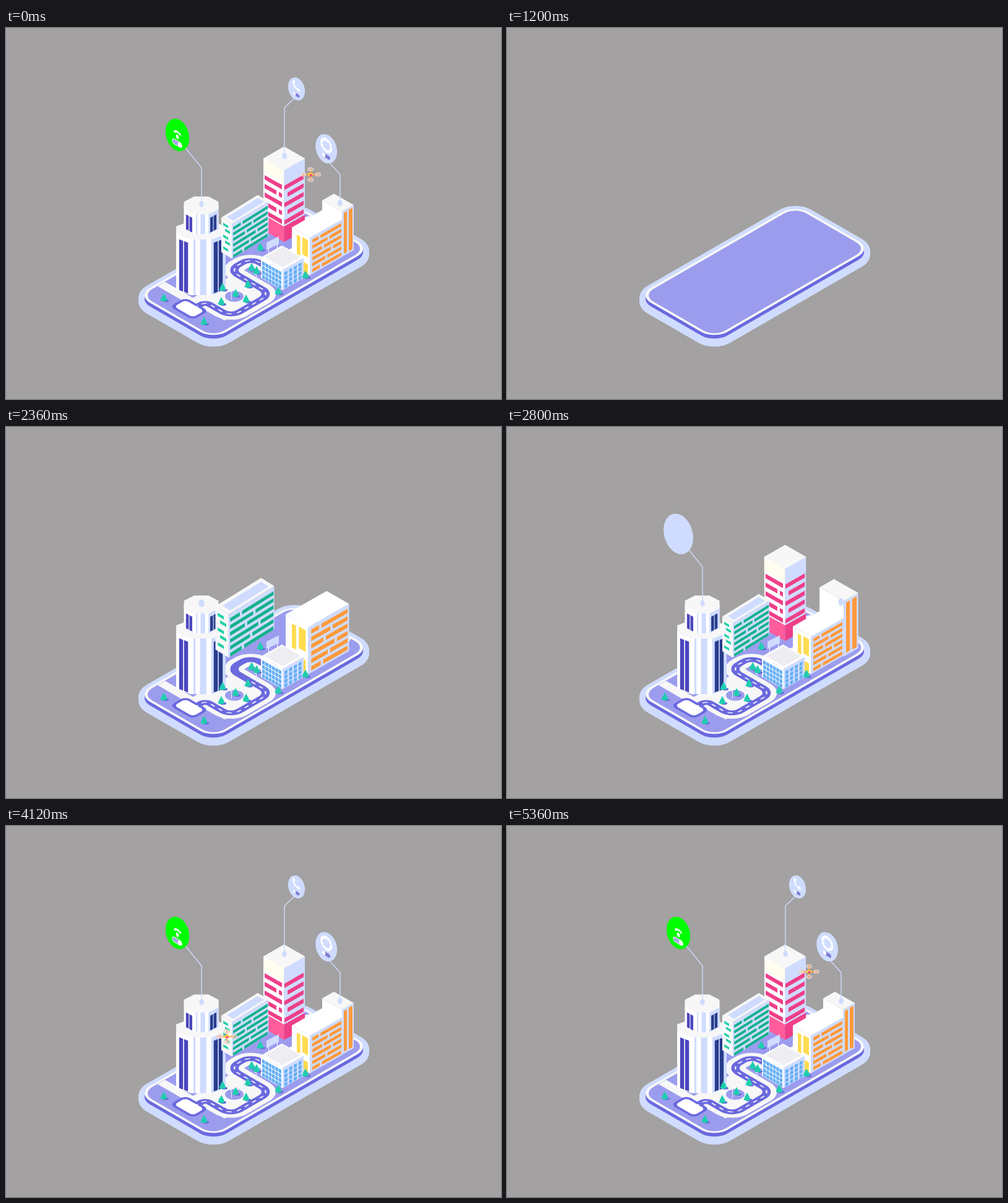
An HTML page with a canvas for the animation above (5.4 s loop, 800 by 600 pixels).

```html
<!DOCTYPE html>
<html>
<head>
<meta charset="utf-8">
<style>
html, body { margin: 0; width: 100%; height: 100%; overflow: hidden; background: #a3a1a1 }
canvas { display: block }
</style>
</head>
<body>
<canvas id="c" width="800" height="600"></canvas>
<script>
const g = document.getElementById('c').getContext('2d');
const GREY = '#a3a1a1', WHITE = '#f7f7f7', PALE = '#cfdcff', DARK = '#6b69de', LILAC = '#9c9cee', BLUE = '#4945bd',
  NAVY = '#283c8c', GREEN = '#14b18c', TEAL = '#20cdb0', PINK = '#ee3f88', ORANGE = '#ff9a3c', YELLOW = '#ffdc50', SKY = '#63aef5';
const LOOP = 5400, K = .57;
let t = 0;

const clamp = x => Math.max(0, Math.min(1, x));
const prog = (start, dur) => clamp((t - start) / dur);
const out = (start, dur) => 1 - (1 - prog(start, dur)) ** 3;

// Grow to 1.25 and settle back to 1
function pop(start) {
  const x = (t - start) / 200;
  if (x <= 0) return 0;
  return x < 1 ? 1.25 * Math.sin(x * Math.PI / 2) : 1.125 + .125 * Math.cos(Math.PI * clamp(x - 1));
}

function group(x, y, s, draw) {
  if (s <= 0) return;
  g.save();
  g.translate(x, y);
  g.scale(s, s);
  g.translate(-x, -y);
  draw();
  g.restore();
}

function poly(color, points) {
  g.fillStyle = color;
  g.beginPath();
  points.forEach(p => g.lineTo(...p));
  g.fill();
}

function oval(color, x, y, rx, ry, turn = 0) {
  g.fillStyle = color;
  g.beginPath();
  g.ellipse(x, y, rx, ry, turn, 0, 7);
  g.fill();
}

function line(...points) {
  g.beginPath();
  points.forEach(p => g.lineTo(...p));
  g.stroke();
}

// Wall panel with upright sides; k is the slope of its top and bottom
const panel = (color, x, y, w, h, k = 0) =>
  poly(color, [[x, y], [x + w, y + k * w], [x + w, y + k * w + h], [x, y + h]]);

// Diamond with its front corner at x, y and sides reaching l left and r right
const roof = (color, x, y, l, r, k = K) =>
  poly(color, [[x, y], [x - l, y - k * l], [x - l + r, y - k * (l + r)], [x + r, y - k * r]]);

function box(x, y, l, r, h, left = '#fff', right = PALE, top = WHITE, k = K) {
  panel(left, x - l, y - h - k * l, l, h, k);
  panel(right, x, y - h, r, h, -k);
  roof(top, x, y - h, l, r, k);
}

// Rows of long windows, each broken in a different place
function bars(color, x, y, w, rows, gap, h, k) {
  for (let i = 0; i < rows; i++) {
    const cut = w * (.25 + .5 * (i * .618 % 1)), top = y + i * gap;
    panel(color, x, top, cut - 1.5, h, k);
    panel(color, x + cut + 1.5, top + k * (cut + 1.5), w - cut - 1.5, h, k);
  }
}

function ground(x, y, s, draw) {
  if (s <= 0) return;
  g.save();
  g.transform(.866 * s, -.5 * s, .866 * s, .5 * s, x, y);
  draw();
  g.restore();
}

// Rounded rectangle on the ground, a and b are half sides
function slab(color, x, y, a, b, r, s = 1) {
  ground(x, y, s, () => {
    g.fillStyle = color;
    g.beginPath();
    g.roundRect(-a, -b, 2 * a, 2 * b, r);
    g.fill();
  });
}

function base() {
  const deck = (color, dy, s, inset = 0) => slab(color, 400.5, 394.5 + dy, 146.7 - inset, 71.1 - inset, 24 - inset, s);
  group(400.5, 401.5, out(240, 360), () => {
    g.strokeStyle = PALE;
    g.lineWidth = 20;
    for (let dy = 5; dy < 10; dy++) {
      deck(PALE, dy, 1);
      g.stroke();
    }
  });
  const body = out(400, 320);
  for (let dy = 6; dy > 0; dy--) deck(DARK, dy * body, body);
  deck(PALE, 0, body);
  deck(WHITE, 0, out(634, 400));
  deck(LILAC, 0, out(742, 420), 4);
}

const corners = [[-88, -2], [-88, 46], [-14, 46], [-14, -31], [26, -31], [26, 5], [127, 5]];

function road(color, width, dash) {
  g.strokeStyle = color;
  g.lineWidth = width;
  g.setLineDash(dash);
  g.beginPath();
  g.moveTo(-109, -2);
  for (let i = 0; i < 6; i++) g.arcTo(...corners[i], ...corners[i + 1], i ? 16 : 8);
  g.lineTo(...corners[6]);
  g.stroke();
}

function streets() {
  g.globalAlpha = prog(1280, 160);
  slab(WHITE, 515, 328.5, 13, 41, 9);
  slab(BLUE, 515.5, 326, 3.2, 29, 3);
  const grow = prog(1340, 360);
  ground(400, 400, grow, () => {
    g.fillStyle = WHITE;
    g.fillRect(-107, -72, 14, 54);
    g.fillRect(-100, -20, 86, 66);
  });
  g.globalAlpha = 1;
  if (!grow) return;
  ground(400, 400, 1, () => {
    road(WHITE, 27, [440 * grow, 999]);
    road(DARK, 11, [440 * grow, 999]);
  });
  slab(LILAC, 369, 434, 12.3, 12.3, 12.3, grow);
  slab(DARK, 296, 454, 14.7, 21.7, 8, grow);
  slab('#fff', 296, 454, 10.5, 17.5, 6, grow);
  // Lane marks appear from the front edge backwards
  g.save();
  g.beginPath();
  g.rect(0, 470 - 110 * prog(1640, 1360), 800, 600);
  g.clip();
  ground(400, 400, 1, () => road('#fff', 1.8, [7, 7]));
  g.restore();
  g.setLineDash([]);
}

function octagon(color, x, y, w, d) {
  const a = i => (i + .5) * Math.PI / 4;
  poly(color, [...Array(8).keys()].map(i => [x + w * 1.08 * Math.cos(a(i)), y + d * 1.08 * Math.sin(a(i))]));
}

function prism(x, y, w, d, h) {
  octagon('#fff', x, y + h, w, d);
  panel('#fff', x - w, y, 2 * w, h);
  panel(PALE, x + .42 * w, y + d, .58 * w, h, -d / w);
  panel(PALE, x - .3 * w, y, .08 * w, h + d);
  panel(PALE, x - .04 * w, y, .26 * w, h + d);
  for (const pos of [.88, .68]) {
    const top = y + d * (1.4 - pos) + 7, wide = .16 * w, drop = wide * d / w;
    panel(BLUE, x - pos * w, top, wide, h - 8, d / w);
    panel(NAVY, x + pos * w - wide, top + drop, wide, h - 8, -d / w);
  }
  octagon(WHITE, x, y, w, d);
}

function skyscraper() {
  prism(315, 327, 40, 15, 90);
  prism(315.5, 287, 28, 14.5, 32);
}

function greenBlock() {
  box(365, 373, 17, 59, 56, WHITE, PALE, WHITE, .62);
  roof(PALE, 367, 312, 10, 50, .62);
  bars(GREEN, 367, 322, 56, 6, 9, 4.8, -.62);
  for (let i = 0; i < 5; i++) panel('#20d0a8', 351 + i % 2 * 3, 315 + i * 9.5, 8, 4, .6);
}

function pinkTower() {
  box(449.5, 346, 25, 33.5, 30, '#ff5c9c', PINK);
  box(449.5, 321, 33.5, 33.5, 91);
  for (let y = 256; y < 320; y += 14) {
    const odd = y % 4 ? 1 : 0;
    panel(PINK, 418, y - 18, 28 - 9 * odd, 7, K);
    panel(PINK, 441, y - 5, 5, 7, K);
    panel(PINK, 450 + 5 * odd, y - 1 - 3 * odd, 31 - 5 * odd, 7, -K);
  }
  box(449.5, 252, 33.5, 33.5, 22, '#fffdf0');
}

function blueBlock() {
  box(447, 424, 35, 34, 33, '#fff', PALE, '#fff');
  roof('#eeeef2', 447, 387, 29, 29);
  for (let i = 0; i < 6; i++) for (let j = 0; j < 4; j++) {
    panel(SKY, 414 + i * 5.3, 377 + j * 7.2 + i * 3, 4.5, 6, K);
    if (i < 4) panel(SKY, 450 + i * 7.6, 395 + j * 7 - i * 4.4, 4.8, 5.5, -K);
  }
  panel(PALE, 421, 347, 20, 12, -.5);
  panel('#fff', 424, 356, 1, 9);
  panel('#fff', 438, 349, 1, 8);
}

function orangeTower() {
  box(543, 370, 32, 19, 73);
  panel(ORANGE, 546, 299, 5, 66, -K);
  panel(ORANGE, 554, 294, 6, 67, -K);
}

function orangeBlock() {
  box(491, 400, 29, 53, 61, '#fff', PALE, '#fff');
  panel(YELLOW, 470, 334, 5.5, 31, K);
  panel(YELLOW, 479, 338, 9, 28, K);
  panel(YELLOW, 470, 372, 18, 17, K);
  bars(ORANGE, 495, 342, 47, 6, 9.5, 5.6, -K);
}

const buildings = [
  [449, 346, 2420, pinkTower], [537, 365, 2560, orangeTower], [502, 400, 2160, orangeBlock],
  [316, 432, 1792, skyscraper], [386, 373, 2160, greenBlock], [447, 424, 1940, blueBlock]
];

// The first seven stand around the park, the rest follow the upper road
const trees = [[391, 415], [350, 420], [371, 430], [388, 439], [348, 443], [255, 437], [320, 475],
  [411, 355], [397, 388], [405, 393], [484, 400], [440, 426]];

function tree(x, y) {
  oval(DARK, x + 3, y + 4, 5, 2.2);
  for (const [dy, w] of [[4, 5.5], [1, 4.2]]) {
    oval(TEAL, x, y + dy - 1, w, 2.2);
    poly(TEAL, [[x, y + dy - 9], [x + w, y + dy - 1], [x - w, y + dy - 1]]);
  }
}

function lamp(x, y) {
  panel('#e6ebff', x, y, 1, 14);
  panel('#e6ebff', x - 3, y, 4, 1);
}

function wifi(lit) {
  oval('#fff', 0, 2 + lit, 2 + lit * .6, 2 + lit * 1.6);
  g.lineWidth = 3.2;
  for (const r of lit > .5 ? [7] : [8, 15]) {
    g.beginPath();
    g.arc(0, 2, r, -2.4, -.75);
    g.stroke();
  }
}

function gear() {
  oval('#fff', 0, -6, 12, 12.6);
  poly(PALE, [...Array(16).keys()].map(i => {
    const r = i % 2 ? 6.5 : 9.5, a = i * Math.PI / 8;
    return [r * Math.cos(a), -6 + r * Math.sin(a)];
  }));
}

function phone() {
  g.lineWidth = 4;
  g.beginPath();
  g.moveTo(-8, -13);
  g.quadraticCurveTo(-8, 0, 5, 1);
  g.stroke();
  oval('#fff', -7, -13, 3.4, 3.8);
  oval('#fff', 5, 0, 3.8, 3.4);
}

function toggle(lit) {
  g.beginPath();
  g.roundRect(-9, 10, 17, 7, 3.5);
  g.lineWidth = 2 * lit;
  if (lit) g.stroke();
  g.fillStyle = lit > .5 ? '#a3a4e6' : '#7d7bd6';
  g.fill();
  oval('#fff', -5.5 + lit * 10, 13.5, 3.6, 3.6);
}

const pins = [
  { foot: [316, 285], bend: 226, end: [290, 194], disc: [277, 173], size: 1, icon: wifi, start: 2600, sign: 3480 },
  { foot: [540, 283], bend: 237, end: [521, 216], disc: [517.7, 195.3], size: .91, icon: gear, start: 3060, sign: 3220 },
  { foot: [450, 207], bend: 129, end: [467, 113], disc: [469.5, 98.5], size: .71, icon: phone, start: 3390, sign: 3640 }
];

// The pins light up in turn, 400 ms apart
function glow(i) {
  const since = t - 4000 - 400 * i;
  return since < 0 ? 0 : clamp(since % 1200 / 60) * clamp((260 - since % 1200) / 60);
}

function pin({ foot, bend, end, disc, size, icon, start, sign }, i) {
  group(...foot, pop(start - 440), () => oval(PALE, ...foot, 3.8, 5));
  const grow = prog(start - 200, 220);
  if (grow) {
    g.strokeStyle = PALE;
    g.lineWidth = 1.4;
    g.setLineDash([110 * grow, 999]);
    line(foot, [foot[0], bend], end);
    g.setLineDash([]);
  }
  const lit = glow(i), mix = (a, b) => a + (b - a) * lit;
  g.save();
  g.translate(...disc);
  g.scale(size, size);
  group(0, 0, pop(start), () => oval(`rgb(${mix(207, 0)},${mix(220, 255)},${mix(255, 0)})`, 0, 0, 18.4, 26.8, -.28));
  g.transform(.866, .5, 0, 1, 0, 0);
  g.strokeStyle = '#fff';
  g.lineCap = 'round';
  group(0, 0, pop(sign), () => icon(lit));
  group(-6, 13, pop(3420 + 120 * i), () => toggle(lit));
  g.restore();
}

// Key points 420 ms apart, joined by a smooth curve
const flight = [[590, 262], [537, 286], [455, 335], [360, 342], [325, 280], [408, 242], [488, 235.5], [508, 264]];

function drone() {
  const time = (t - 3260) / 420;
  if (time <= 0) return;
  const i = Math.floor(time), u = time - i;
  const [a, b, c, d] = flight.slice(i, i + 4).concat([flight[7]]);
  const spot = k => b[k] + u * (c[k] - a[k] + u * (2 * a[k] - 5 * b[k] + 4 * c[k] - d[k] + u * (3 * b[k] - 3 * c[k] + d[k] - a[k]))) / 2;
  g.save();
  g.translate(spot(0), spot(1));
  const s = prog(3220, 160);
  g.scale(s, s);
  const rotors = [[0, -8.5], [-12, 0], [12, 0], [0, 8.5]];
  g.strokeStyle = ORANGE;
  g.lineWidth = 1.8;
  rotors.forEach(p => line([0, 0], p));
  oval('#ffc93c', 0, 0, 4.5, 2.6);
  oval(PINK, .5, 1, 2.4, 1.6);
  for (const p of rotors) {
    oval('rgba(255,255,255,.4)', ...p, 4.6, 2.8);
    for (const [color, w] of [['#f5e4e2', 1.2], ['#c98a78', .5]]) {
      g.strokeStyle = color;
      g.lineWidth = w;
      g.stroke();
    }
    oval(ORANGE, ...p, 1.2, .9);
  }
  g.restore();
}

function frame(now) {
  const step = Math.floor(now % LOOP / 40) * 40;
  t = step < 240 ? LOOP : step;
  g.fillStyle = GREY;
  g.fillRect(0, 0, 800, 600);
  base();
  streets();
  for (const [x, y, start, draw] of buildings) group(x, y, pop(start), draw);
  trees.forEach(([x, y], i) => group(x, y + 4, pop((i < 7 ? 1500 : 1760) + i * 20), () => tree(x, y)));
  for (let i = 0; i < 3; i++) group(364 + 20 * i, 440 - 14 * i, prog(2040, 200), () => lamp(364 + 20 * i, 426 - 14 * i));
  pins.forEach(pin);
  drone();
}

const begin = performance.now();
function tick() {
  frame(performance.now() - begin);
  requestAnimationFrame(tick);
}
tick();
</script>
</body>
</html>
```
